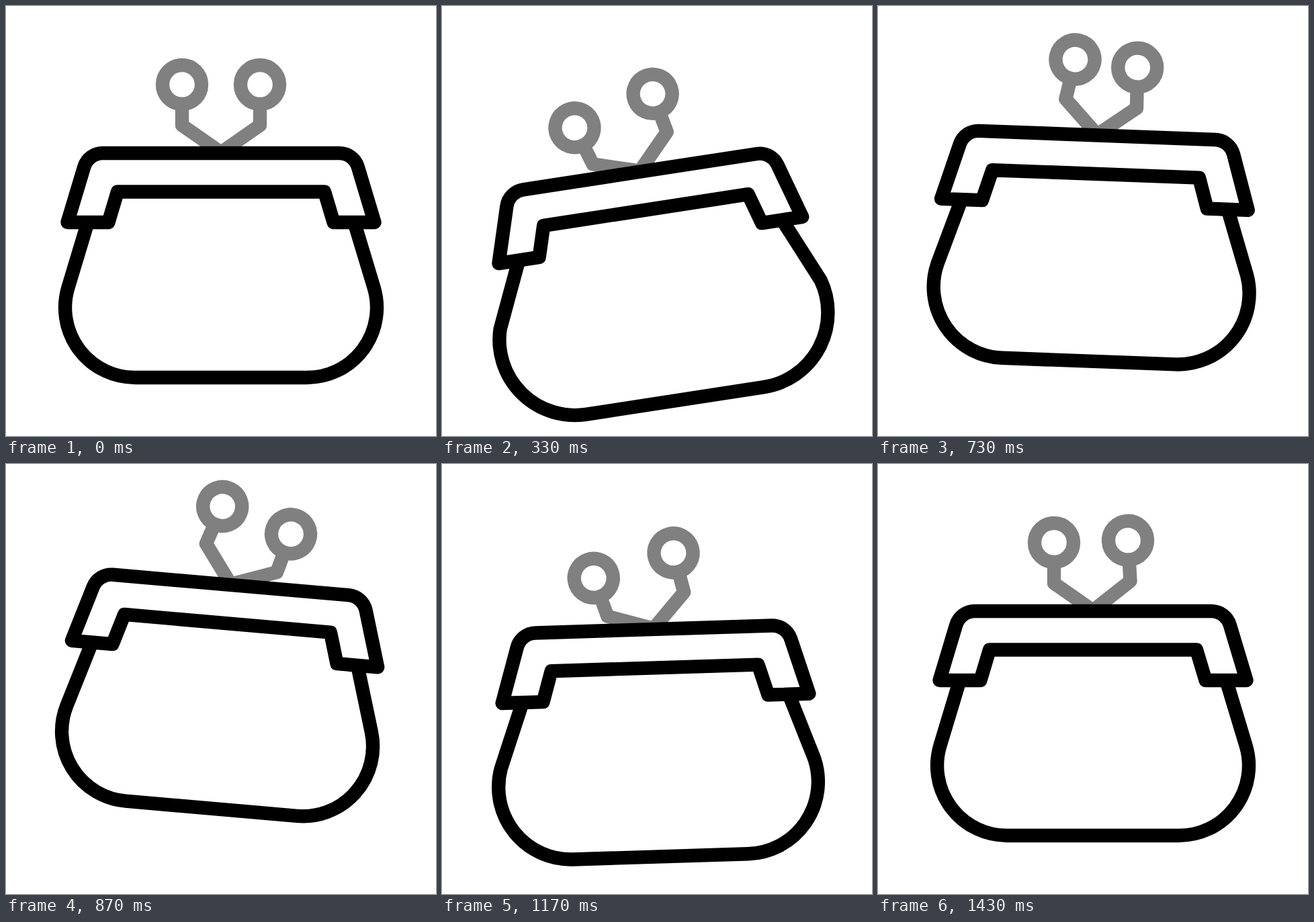
These frames come from a looping animation (640 by 640 pixels, 2000 ms). An HTML page:

```html
<!DOCTYPE html>
<html lang="en">
<head>
<meta charset="utf-8">
<title>Purse</title>
<style>
  html, body { margin: 0; width: 100%; height: 100%; overflow: hidden; background: #fff; }
  svg { display: block; width: 100%; height: 100%; }
</style>
</head>
<body>
<svg viewBox="0 0 640 640" fill="none" stroke="#000" stroke-width="20.4" stroke-linecap="round" stroke-linejoin="round">
  <g id="purse">
    <g id="left" stroke="#808080">
      <circle cx="262" cy="117" r="29"/>
      <path d="M262 146V177.5L320 218"/>
    </g>
    <g id="right" stroke="#808080">
      <circle cx="378" cy="117" r="29"/>
      <path d="M378 146V177.5L320 218"/>
    </g>
    <path id="bag"/>
    <path fill="#fff" d="M91.5 322L116.2 239.7A29 29 0 0 1 144 219H496A29 29 0 0 1 523.8 239.7L548.5 322H487.6L474 276.5H166L152.4 322Z"/>
  </g>
</svg>
<script>
const LOOP = 2000, LAST = 43;
const $ = id => document.getElementById(id);
const purse = $('purse'), left = $('left'), right = $('right'), bag = $('bag');

// Key times in ticks of 1/30 s
const BODY = [0, 12.5, 25.7, 33, 43];
const LAG = [2.7, 16, 27.9, 37.6, 44.9];

const smooth = u => u * u * (3 - 2 * u);

function tween(keys, values, n) {
  if (n <= keys[0]) return values[0];
  for (let i = 1; i < keys.length; i++) {
    if (n > keys[i]) continue;
    let e = smooth((n - keys[i - 1]) / (keys[i] - keys[i - 1]));
    if (i === 1 && keys === BODY) e **= 1.25; // slower first push
    return values[i - 1] + (values[i] - values[i - 1]) * e;
  }
  return values[values.length - 1];
}

// Bag outline, swollen by b
function bagPath(b) {
  const side = 92.4 - 14 * b, foot = 192 - 6.3 * b;
  const base = 553 + 11.1 * b, r = 104 + 8.5 * b;
  const arc = `A${r} ${r} 0 0 0 `;
  return `M121.7 322L${side} 419.2${arc}${foot} ${base}` +
    `H${640 - foot}${arc}${640 - side} 419.2L518.3 322`;
}

function render(ms) {
  const n = Math.min(LAST, Math.floor((Math.floor((ms + 0.5) / 10) * 3 + 1) / 10));
  const dy = tween(BODY, [0, 29.5, -40, 30, 0], n);
  const tilt = tween(BODY, [0, -10, 5, -2, 0], n);
  const swell = tween(BODY, [0, 1.12, 0, 0.46, 0], n);
  const turnL = tween(BODY, [0, -20.5, 19, -20.3, 0], n);
  const turnR = tween(LAG, [0, -20.5, 18, -20, 0], n);

  purse.setAttribute('transform', `translate(0 ${dy}) rotate(${tilt} 320 386)`);
  left.setAttribute('transform', `rotate(${turnL} 320 218)`);
  right.setAttribute('transform', `rotate(${turnR} 320 218)`);
  bag.setAttribute('d', bagPath(swell));
}

const start = performance.now();
function tick() {
  render((performance.now() - start) % LOOP);
  requestAnimationFrame(tick);
}
render(0);
requestAnimationFrame(tick);
</script>
</body>
</html>
```
